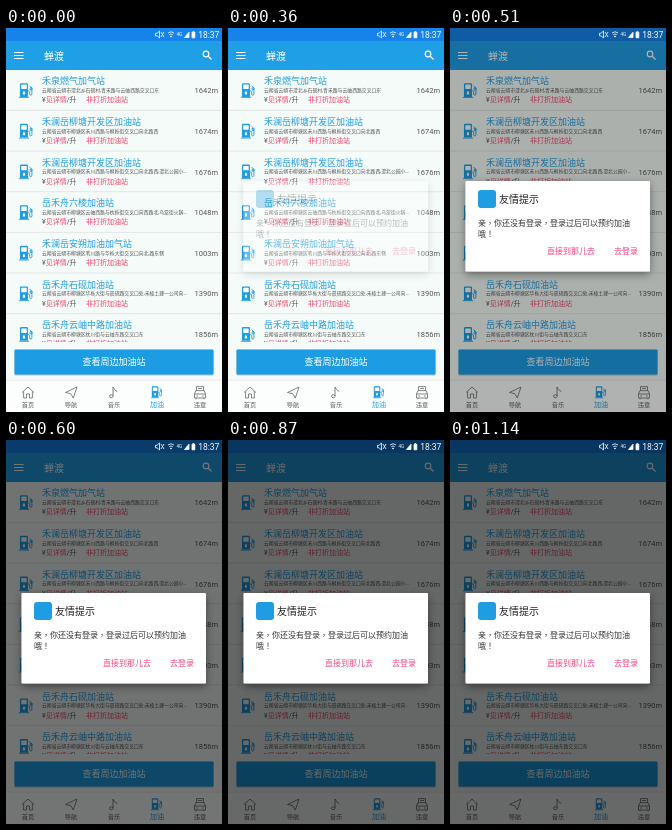
An HTML page for the animation above (1170 ms loop, 216 px wide and 384 px high).

```html
<!DOCTYPE html>
<html lang="zh-CN">
<head>
<meta charset="utf-8">
<style>
html, body { margin: 0; width: 100%; height: 100%; overflow: hidden; background: #f5fbf8; }
svg { display: block; width: 100%; height: 100%; }
text { font-family: Roboto, "Noto Sans CJK SC", "Noto Sans CJK", sans-serif; white-space: pre; }
.message text { font-family: "Noto Sans CJK TC", "Noto Sans CJK", sans-serif; }
</style>
</head>
<body>
<svg viewBox="0 0 216 384" xmlns="http://www.w3.org/2000/svg">
  <defs>
    <symbol id="pump" viewBox="0 0 16 18" overflow="visible">
      <path d="M1.5 16.5V2.2Q1.5 1 2.7 1H9.3Q10.5 1 10.5 2.2V16.5Z" fill="currentColor"/>
      <rect x="2.9" y="2.6" width="6.2" height="5" rx=".5" fill="#fff"/>
      <path d="M6 9.6Q8 12 7.2 13.2A1.5 1.5 0 0 1 4.8 13.2Q4 12 6 9.6Z" fill="#fff"/>
      <path d="M.3 17H11.7M10.5 9.5H11.4Q12.4 9.5 12.4 10.6V13.2Q12.4 14.6 13.6 14.6T14.9 13.2V6.4L12.3 3.8M12.9 6.2H14.9V8.6H12.9Z" fill="none" stroke="currentColor"/>
    </symbol>
    <filter id="shadow" x="-20%" y="-30%" width="140%" height="170%">
      <feDropShadow dx="0" dy="3" stdDeviation="4" flood-color="#000" flood-opacity=".4"/>
    </filter>
    <filter id="lift" x="-5%" y="-20%" width="110%" height="150%">
      <feDropShadow dx="0" dy=".6" stdDeviation=".6" flood-color="#000" flood-opacity=".4"/>
    </filter>
  </defs>

  <rect width="216" height="384" fill="#f5fbf8"/>
  <g id="list"></g>

  <rect y="314" width="216" height="38" fill="#f5fbf8"/>
  <rect x="8.5" y="321.5" width="199" height="25" rx="1" fill="#1f9de3" filter="url(#lift)"/>
  <text x="108" y="337.4" font-size="9" fill="#fff" text-anchor="middle">查看周边加油站</text>

  <rect width="216" height="42" fill="#1f9fe5"/>
  <rect width="216" height="13" fill="#1583ea"/>
  <path d="M8 24.5H17.5M8 27.5H17.5M8 30.5H17.5" stroke="#fff"/>
  <text x="38" y="31.5" font-size="10" fill="#fff">蝉渡</text>
  <g fill="none" stroke="#fff" stroke-width="1.2">
    <circle cx="200" cy="26" r="2.8"/>
    <path d="M202 28L205.5 31.5"/>
  </g>

  <rect y="352" width="216" height="32" fill="#fbfefd"/>
  <path d="M0 352.2H216" stroke="#ddd" stroke-width=".6"/>
  <g fill="none" stroke="#666" stroke-width=".8" stroke-linejoin="round">
    <path d="M16 364.5L22 359L28 364.5M17.6 363.5V370H20.5V366H23.5V370H26.4V363.5"/>
    <path d="M59.5 364.5L71 359L67.3 370L64.8 365.7Z"/>
    <path d="M107 368V359Q108 362 111.3 363.6"/>
    <ellipse cx="105.3" cy="368.2" rx="1.8" ry="1.5"/>
    <path d="M188.5 366L190 362.6H198L199.5 366V370H188.5ZM188.5 366H199.5M190 370V371.4M198 370V371.4M190.3 368H192M196 368H197.7M190.5 362.6V358.6H197.5V362.6M192 360.5H196"/>
  </g>
  <use href="#pump" x="144.5" y="357.5" width="12" height="13" color="#1f9de3"/>
  <g id="tabs"></g>

  <rect id="dim" width="216" height="384" fill="#000" opacity="0"/>

  <g fill="none" stroke="#fff" stroke-width=".8">
    <path d="M149.5 5.3H151L153.5 3V10L151 7.8H149.5ZM155 4L158 9M158 4L155 9"/>
    <path d="M162 5Q165 2.5 168 5M163.3 6.7Q165 5.3 166.7 6.7"/>
    <circle cx="165" cy="8.5" r=".5" fill="#fff"/>
    <path d="M178.5 9.5H183V4.2Z" fill="#fff"/>
    <path d="M186 4.2H188.8V9.8H186ZM186.7 3.5H188.1" fill="#fff"/>
  </g>
  <text x="170.5" y="7.6" font-size="4.6" fill="#fff">4G</text>
  <text x="213.4" y="10" font-size="8.5" fill="#fff" text-anchor="end">18:37</text>

  <g id="dialog" opacity="0">
    <rect x="15.5" y="153" width="184.5" height="90.5" rx="1" fill="#fff" filter="url(#shadow)"/>
    <rect x="28" y="162" width="18" height="18" rx="3" fill="#1f9de3"/>
    <text x="49" y="174.8" font-size="10" fill="#222">友情提示</text>
    <g class="message" lang="zh-TW" font-size="8" fill="#333">
      <text x="28" y="197.5">亲，你还没有登录，登录过后可以预约加油</text>
      <text x="28" y="208.5">哦！</text>
    </g>
    <g font-size="8" fill="#f4427c">
      <text x="97" y="226">直接到那儿去</text>
      <text x="164" y="226">去登录</text>
    </g>
  </g>
</svg>
<script>
const $ = id => document.getElementById(id);
const LOOP = 1170, STEP = 30, BLUE = '#1f9de3', PINK = '#f4456b';
const label = (x, y, size, fill, s, anchor = 'start') =>
  `<text x="${x}" y="${y}" font-size="${size}" fill="${fill}" text-anchor="${anchor}">${s}</text>`;

const city = '云朔省云朔市', area = city + '柳塘区';
const corner = '禾川西路与枫栎街交叉口向北路西';
const stations = [
  ['禾泉燃气加气站', city + '澄北乡石砚村,青禾路与云岫西路交叉口东', 1642],
  ['禾澜岳柳塘开发区加油站', area + corner, 1674],
  ['禾澜岳柳塘开发区加油站', area + corner + ',澄北公园小…', 1676],
  ['岳禾舟六棱加油站', area + '云岫西路与枕栎街交叉口向西路北,乌棠街火锅…', 1048],
  ['禾澜岳安朔加油加气站', area + '苇川路与华栎大街交叉口向北,路东侧', 1003],
  ['岳禾舟石砚加油站', area + '华栎大街与晨砚路交叉口处,禾棱土建一公司向…', 1390],
  ['岳禾舟云岫中路加油站', area + '枕川街与云岫东路交叉口东', 1856]
];

$('list').innerHTML = stations.map(([name, address, metres], i) => {
  const y = 42 + i * 40.65;
  return `<path d="M0 ${y + 40.4}H216" stroke="#ddd" stroke-width=".7"/>` +
    `<use href="#pump" x="12.5" y="${y + 12.3}" width="14.5" height="16" color="${BLUE}"/>` +
    label(36, y + 14.4, 9, BLUE, name) +
    label(36, y + 22, 4.85, '#555', address) +
    label(36, y + 32.3, 7, '#555', `¥<tspan fill="${PINK}">见详情</tspan>/升`) +
    label(80, y + 32.3, 7, PINK, '非打折加油站') +
    label(212, y + 23.2, 7.5, '#555', metres + 'm', 'end');
}).join('');

$('tabs').innerHTML = ['首页', '导航', '音乐', '加油', '违章'].map((name, i) => {
  const on = i === 3;
  return label(22 + i * 43, 379.2, on ? 7 : 6.2, on ? BLUE : '#555', name, 'middle');
}).join('');

// Linear interpolation through [time, value] points
function track(t, points) {
  let [t0, v0] = points[0];
  if (t <= t0) return v0;
  for (const [t1, v1] of points) {
    if (t < t1) return v0 + (v1 - v0) * (t - t0) / (t1 - t0);
    [t0, v0] = [t1, v1];
  }
  return v0;
}

function draw(now) {
  const t = Math.floor(now % LOOP / STEP) * STEP;
  $('dialog').setAttribute('opacity', track(t, [[320, 0], [360, .3], [480, 1]]));
  $('dim').setAttribute('opacity', track(t, [[360, 0], [510, .3], [600, .54], [660, .59]]));
}

const start = performance.now();
function tick() {
  draw(performance.now() - start);
  requestAnimationFrame(tick);
}
tick();
</script>
</body>
</html>
```
